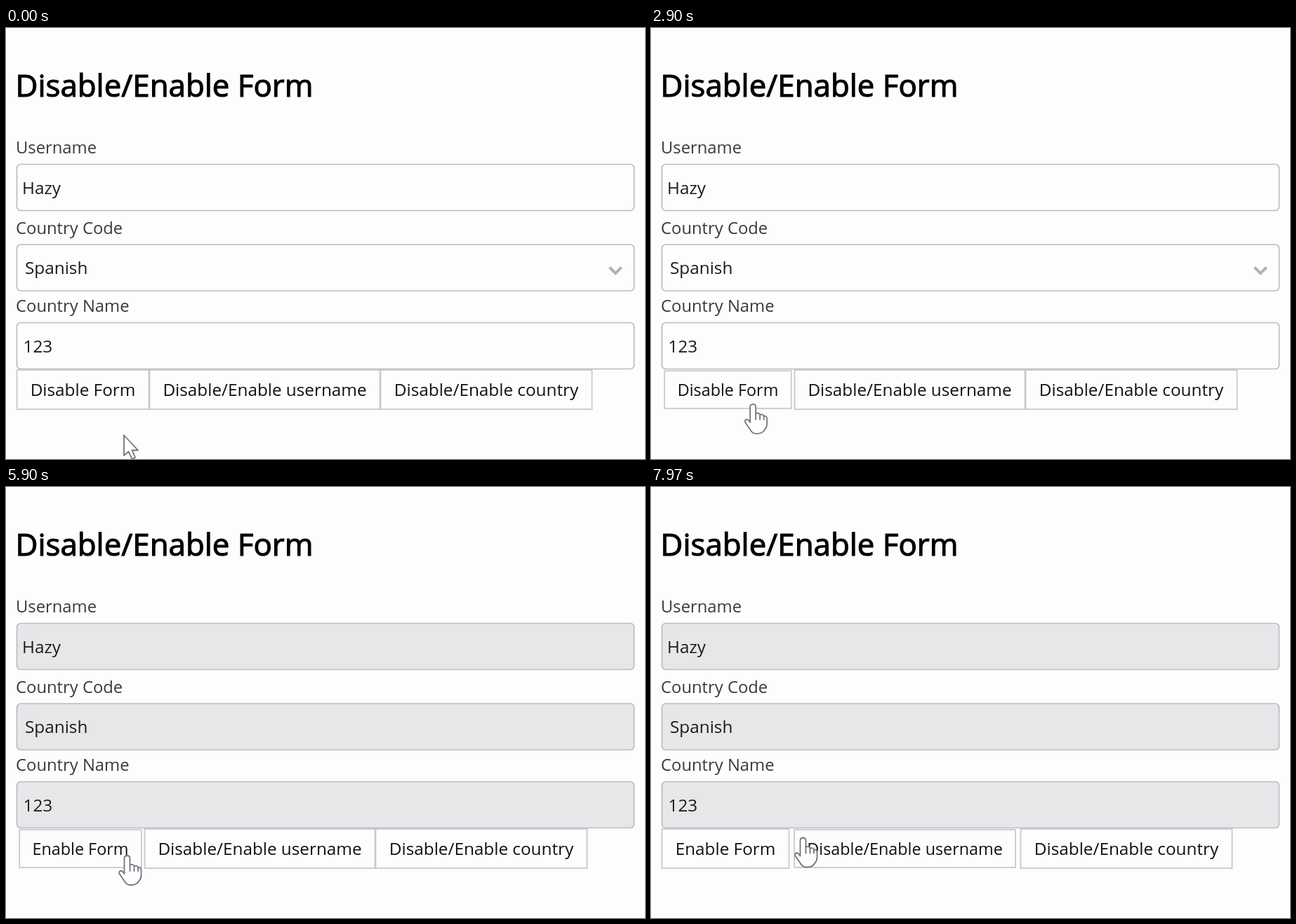
An HTML page that plays this animation: 910 by 615 pixels, repeating every 8 s.

```html
<!DOCTYPE html>
<html lang="en">
<head>
<meta charset="utf-8">
<title>Disable/Enable Form</title>
<style>
  html, body { margin: 0; width: 100%; height: 100%; overflow: hidden; background: #fdfdfd; }
  svg { display: block; width: 910px; height: 615px; font-family: "Open Sans", sans-serif; }
  .title { font-size: 43.8px; stroke: #000; stroke-width: 1.1px; }
  .label { font-size: 23.8px; fill: #3a3a3a; }
  .value { font-size: 24.3px; fill: #1c1c1c; }
  .field { stroke: #bcbcc2; stroke-width: 1.7px; }
  .button rect { fill: #fdfdfd; stroke: #c8c8d0; stroke-width: 1.8px; }
  .button text { font-size: 24.3px; fill: #111; text-anchor: middle; }
  .cursor { fill: #fff; stroke: #74747f; stroke-width: 1.8px; stroke-linejoin: round; stroke-linecap: round; }
</style>
</head>
<body>
<svg viewBox="0 0 910 615">
  <rect width="910" height="615" fill="#fdfdfd"/>
  <text class="title" x="13.5" y="98">Disable/Enable Form</text>
  <g id="fields"></g>
  <path id="chevron" d="M859.5 341.5L868 350L876.5 341.5" fill="none" stroke="#b0b0b8" stroke-width="4"/>
  <g id="buttons"></g>
  <path id="arrow" class="cursor" d="M0 0V29L6.5 23.5L11.5 34L16 32L11.5 21.5H20Z"/>
  <g id="hand" class="cursor">
    <path d="M-4 27V5Q-4 1 0 1T4 5V14Q9 12.500 10 16Q14.500 14.500 15.500 18Q20 17 20 22V29Q20 34 17 37Q14 43 5 43Q-1 43 -4 37L-11 27Q-12 23 -9 22.500Q-7 22.500 -4 27Z"/>
    <path d="M4 14V23M10 16V23M15.500 18V23" fill="none"/>
  </g>
</svg>
<script>
const LOOP = 8000;
const FIELDS = [
  { label: "Username", value: "Hazy", x: 23, top: 194.5, labelY: 179 },
  { label: "Country Code", value: "Spanish", x: 27, top: 309, labelY: 294 },
  { label: "Country Name", value: "123", x: 24.5, top: 420.5, labelY: 405 }
];
const BUTTONS = [
  { text: "Disable Form", width: 189 },
  { text: "Disable/Enable username", width: 329 },
  { text: "Disable/Enable country", width: 302 }
];
const BUTTON_TOP = 487, BUTTON_HEIGHT = 58, HOVER_SCALE = 0.96;

// Cursor stops: time, x, y
const PATH = [
  [0, 168, 581], [310, 168, 581], [730, 140, 536],
  [2870, 140, 536], [3270, 442, 525],
  [3800, 442, 525], [4130, 262, 533],
  [4240, 262, 533], [4430, 172.5, 525],
  [6400, 172.5, 525], [6970, 660, 525],
  [7200, 660, 525], [7600, 140, 529],
  [7800, 140, 529], [7970, 216.5, 499.5], [LOOP, 216.5, 499.5]
];
const FORM_OFF = [[1030, 2130], [4870, 6300], [7720, LOOP]];
const USERNAME_OFF = [[3500, 6300]];

const byId = id => document.getElementById(id);
const within = (t, spans) => spans.some(([from, to]) => t >= from && t < to);
const smooth = p => p * p * (3 - 2 * p);

function add(parent, tag, attrs, text) {
  const node = document.createElementNS("http://www.w3.org/2000/svg", tag);
  for (const name in attrs) node.setAttribute(name, attrs[name]);
  if (text) node.textContent = text;
  return parent.appendChild(node);
}

function show(node, visible) {
  node.setAttribute("visibility", visible ? "visible" : "hidden");
}

for (const f of FIELDS) {
  const group = byId("fields");
  add(group, "text", { class: "label", x: 14, y: f.labelY }, f.label);
  f.box = add(group, "rect", { class: "field", x: 15.5, y: f.top, width: 879, height: 66, rx: 5.5 });
  add(group, "text", { class: "value", x: f.x, y: f.top + 42 }, f.value);
}

for (const b of BUTTONS) {
  b.group = add(byId("buttons"), "g", { class: "button" });
  b.box = add(b.group, "rect", { y: 1 - BUTTON_HEIGHT / 2, height: BUTTON_HEIGHT - 2 });
  b.caption = add(b.group, "text", { y: 9 }, b.text);
}

function cursorAt(t) {
  const i = Math.max(1, PATH.findIndex(stop => stop[0] > t));
  const [t0, x0, y0] = PATH[i - 1], [t1, x1, y1] = PATH[i];
  const p = smooth((t - t0) / (t1 - t0));
  return { x: x0 + (x1 - x0) * p, y: y0 + (y1 - y0) * p };
}

function draw(t) {
  const formOff = within(t, FORM_OFF);
  const off = [formOff || within(t, USERNAME_OFF), formOff, formOff];
  FIELDS.forEach((f, i) => f.box.setAttribute("fill", off[i] ? "#e7e7e9" : "#fdfdfd"));
  show(byId("chevron"), !formOff);

  const { x, y } = cursorAt(t);
  const inRow = y >= BUTTON_TOP && y < BUTTON_TOP + BUTTON_HEIGHT;
  let left = 15, overButton = false;
  BUTTONS.forEach((b, i) => {
    const width = i === 0 && formOff ? 182 : b.width;
    const hovered = inRow && x >= left && x < left + width;
    overButton = overButton || hovered;
    b.box.setAttribute("x", 0.5 - width / 2);
    b.box.setAttribute("width", width - 1);
    if (i === 0) b.caption.textContent = formOff ? "Enable Form" : b.text;
    b.group.setAttribute("transform",
      `translate(${left + width / 2} ${BUTTON_TOP + BUTTON_HEIGHT / 2}) scale(${hovered ? HOVER_SCALE : 1})`);
    left += width;
  });

  for (const id of ["arrow", "hand"]) {
    byId(id).setAttribute("transform", `translate(${x} ${y})`);
    show(byId(id), (id === "hand") === overButton);
  }
}

const start = performance.now();
function tick() {
  draw((performance.now() - start) % LOOP);
  requestAnimationFrame(tick);
}
tick();
</script>
</body>
</html>
```
